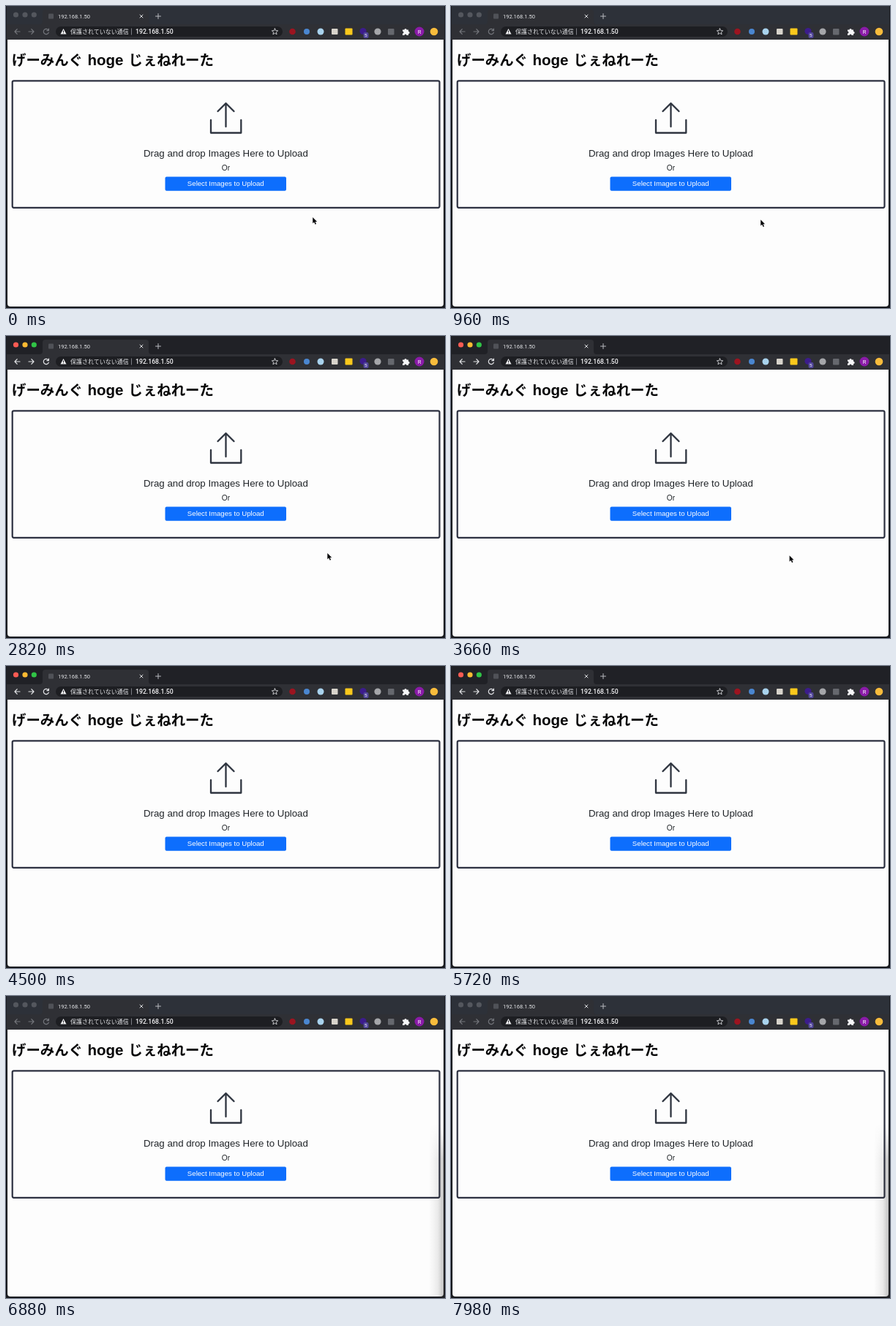
Recreate the animation shown at these times as an HTML page. Size 600 by 413 pixels, loop 8000 ms.

```html
<!DOCTYPE html>
<html lang="ja">
<head>
<meta charset="utf-8">
<title>Image upload</title>
<style>
  html, body { margin: 0; width: 100%; height: 100%; overflow: hidden; background: #17191e; }
  svg { display: block; width: 100vw; height: 100vh; }
  text { font-family: "Liberation Sans", Arial, sans-serif; }
  .ui { font-family: Roboto, sans-serif; }
  .jp { font-family: "Noto Sans CJK JP", "Noto Sans CJK", sans-serif; }
  .title { font-size: 19.4px; font-weight: 700; fill: #050506; }
  .center { text-anchor: middle; }
  .line { fill: none; stroke-linecap: round; stroke-linejoin: round; }
</style>
</head>
<body>
<svg viewBox="0 0 600 413">
  <defs>
    <linearGradient id="shade">
      <stop offset="0" stop-color="#333" stop-opacity="0"/>
      <stop offset=".55" stop-color="#333" stop-opacity=".09"/>
      <stop offset="1" stop-color="#333" stop-opacity=".34"/>
    </linearGradient>
    <linearGradient id="fade" x2="0" y2="1">
      <stop offset="0" stop-color="#000"/>
      <stop offset=".2" stop-color="#fff"/>
    </linearGradient>
    <mask id="soften"><rect x="575" y="175" width="25" height="238" fill="url(#fade)"/></mask>
  </defs>

  <!-- window frame, tab strip and toolbar -->
  <rect width="600" height="413" fill="#17191e"/>
  <rect id="strip" x="1" width="598" height="26"/>
  <path id="tab" d="M46 25q4 0 4-4V9q0-4 4-4H191q4 0 4 4v12q0 4 4 4z"/>
  <rect id="bar" x="1" y="25" width="598" height="21"/>
  <rect x="68" y="28" width="310" height="14" rx="7" fill="#1d1e22"/>

  <g id="lights">
    <circle cx="13.5" cy="12" r="3.6"/><circle cx="26" cy="12" r="3.6"/><circle cx="38.3" cy="12" r="3.6"/>
  </g>
  <rect x="58" y="10.5" width="7" height="7" rx="1" fill="#505258"/>
  <text class="ui" x="71" y="17" font-size="7.5" fill="#e4e5e8">192.168.1.50</text>
  <path class="line" d="M183 12l4 4m0-4l-4 4" stroke="#dcdde0"/>
  <path class="line" d="M204.5 14h7m-3.5-3.5v7" stroke="#b8babf"/>

  <g id="nav" class="line" stroke-width="1.2">
    <path d="M19 35h-7m3.2-3.3L12 35l3.2 3.3"/>
    <path d="M31 35h7m-3.2-3.3L38 35l-3.2 3.3"/>
    <path d="M58 33.2a3.6 3.6 0 1 0 .3 3M58.4 31v2.6h-2.6"/>
  </g>
  <path d="M78.5 31l4 7.5h-8z" fill="#f0f0f2"/>
  <path d="M78.5 33.5v2.4m0 .8v.8" stroke="#1d1e22"/>
  <text class="jp" x="88" y="38" font-size="8" font-weight="500" fill="#e4e5e8">保護されていない通信</text>
  <path d="M171.5 30.5v9" stroke="#7c7e84"/>
  <text class="ui" x="177" y="38" font-size="8.7" font-weight="500" fill="#f6f6f8">192.168.1.50</text>
  <path class="line" d="M367.5 30.8l1.2 2.8 3 .2-2.3 2 .7 3-2.6-1.6-2.6 1.6.7-3-2.3-2 3-.2z" stroke="#d4d5d9" stroke-width=".9"/>

  <!-- extension buttons -->
  <circle cx="391.5" cy="35" r="4.3" fill="#9c1420"/>
  <circle cx="411" cy="35" r="4" fill="#4a86d0"/>
  <circle cx="430" cy="35" r="4.5" fill="#a9d3ee"/>
  <rect x="445" y="31" width="8.5" height="8" rx="1" fill="#d8d4cc"/>
  <rect x="463.5" y="30.5" width="10" height="9" rx="1" fill="#fbc91c"/>
  <circle cx="488" cy="34.5" r="4.6" fill="#3c1c8c"/>
  <rect x="488.5" y="36" width="7" height="8" rx="2" fill="#51459b"/>
  <text class="center" x="492" y="42.2" font-size="6" fill="#fff">5</text>
  <circle cx="508" cy="35" r="4.6" fill="#a5a6aa"/>
  <rect x="522" y="31" width="8.5" height="8.5" rx="1" fill="#66686e"/>
  <path d="M542 32.5h2.4a1.6 1.6 0 1 1 3.2 0h2.4v2.3a1.6 1.6 0 1 1 0 3.2v2h-2.5a1.5 1.5 0 0 0-3 0H542v-2.5a1.5 1.5 0 0 0 0-3z" fill="#f6f6f8"/>
  <circle cx="565" cy="35" r="6.5" fill="#8a1ba8"/>
  <text class="center ui" x="565" y="37.7" font-size="7.5" fill="#fff">R</text>
  <circle cx="585" cy="35" r="5.3" fill="#f8bc3c"/>

  <!-- page -->
  <path d="M2 46H598V407q0 4-4 4H6q-4 0-4-4z" fill="#fdfdfd"/>
  <text class="jp title" x="8" y="81">げーみんぐ</text>
  <text class="title" x="111.5" y="81" style="font-size:20.5px">hoge</text>
  <text class="jp title" x="167.5" y="81">じぇねれーた</text>

  <rect x="8.7" y="102.3" width="583.8" height="173.5" rx="2" fill="none" stroke="#2c3040" stroke-width="2.2"/>
  <path class="line" d="M280 156v17.5h41.3V156M300.5 165v-31.5M289.5 144l11-11 11 11" stroke="#2f3540" stroke-width="2.3"/>
  <g class="center" fill="#212529">
    <text x="300.4" y="206" font-size="13.27">Drag and drop Images Here to Upload</text>
    <text x="300.4" y="225" font-size="10.2">Or</text>
  </g>
  <rect x="217.5" y="233.5" width="165.5" height="19.3" rx="2" fill="#0d6efd"/>
  <text class="center" x="300.3" y="246.3" font-size="9.65" fill="#fff">Select Images to Upload</text>

  <rect id="shadow" x="578" y="175" width="22" height="238" fill="url(#shade)" mask="url(#soften)"/>
  <path id="cursor" d="M0 0V8.2L1.9 6.5 3.4 9.7 4.8 9.1 3.4 5.9H5.9z" fill="#08080a" stroke="#fdfdfd" stroke-width=".8" paint-order="stroke"/>
</svg>

<script>
const LOOP = 8000, FOCUS = 2240, BLUR = 5860;
const byId = id => document.getElementById(id);
const paint = (id, attribute, color) => byId(id).setAttribute(attribute, color);

// Pointer stops: [ms, x, y]; the last one lies beyond the right edge
const path = [
  [0, 419.2, 289], [840, 419.2, 289], [1220, 436, 303], [1520, 439.3, 297],
  [3540, 439.3, 297], [4140, 660, 328]
];

function pointerAt(time) {
  const next = path.findIndex(stop => stop[0] > time);
  if (next < 0) return path[path.length - 1].slice(1);
  const [t0, x0, y0] = path[next - 1], [t1, x1, y1] = path[next];
  const p = (time - t0) / (t1 - t0), eased = p * p * (3 - 2 * p);
  return [x0 + (x1 - x0) * eased, y0 + (y1 - y0) * eased];
}

function setFocus(active) {
  paint("strip", "fill", active ? "#202126" : "#2d3139");
  paint("tab", "fill", "#2f3035");
  paint("bar", "fill", "#2f3035");
  paint("nav", "stroke", active ? "#e4e5e8" : "#74767c");
  const colors = active ? ["#fc5b53", "#fcba32", "#30c446"] : Array(3).fill("#54575e");
  [...byId("lights").children].forEach((light, i) => light.setAttribute("fill", colors[i]));
}

function draw(now) {
  const time = now % LOOP;
  setFocus(time >= FOCUS && time < BLUR);
  byId("shadow").setAttribute("visibility", time >= BLUR ? "visible" : "hidden");
  byId("cursor").setAttribute("transform", `translate(${pointerAt(time)})`);
  requestAnimationFrame(draw);
}
draw(0);
</script>
</body>
</html>
```
